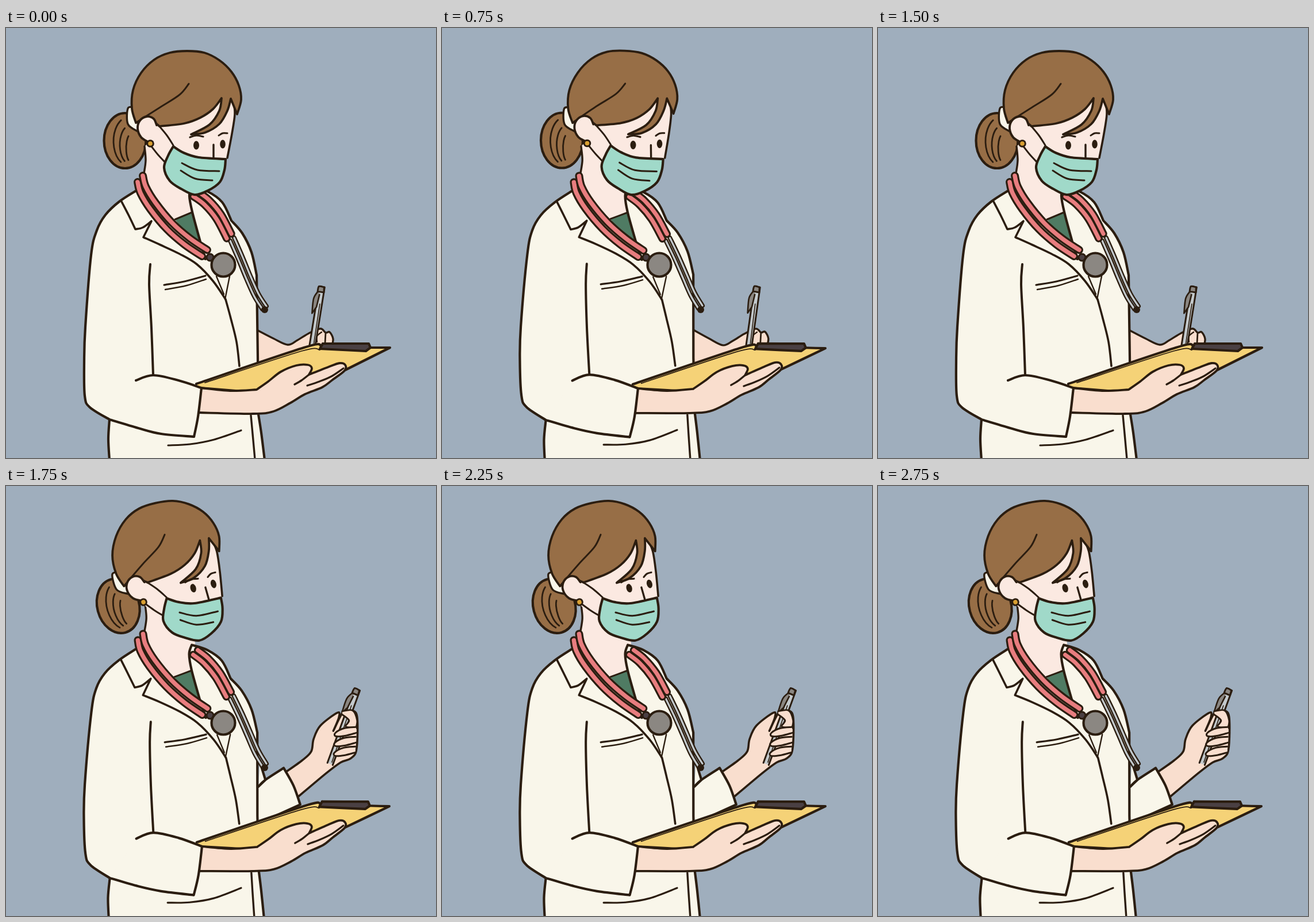
Animation of 748 by 748 pixels, one loop 3000 ms. Source, as an HTML page with a canvas:

```html
<!DOCTYPE html>
<html lang="en">
<head>
<meta charset="utf-8">
<title>Doctor taking notes</title>
<style>
html, body { margin: 0; width: 100%; height: 100%; overflow: hidden; background: #9faebd; }
canvas { display: block; width: 100vw; height: 100vh; }
</style>
</head>
<body>
<canvas id="stage" width="748" height="748"></canvas>
<script>
const ctx = document.getElementById('stage').getContext('2d');
const SKY = '#9faebd', INK = '#2b1d10', COAT = '#f9f6ea', HAIR = '#976e46', FACE = '#fbe9e1',
  SKIN = '#f9dece', MASK = '#a0d9c9', RED = '#e87d7f', GREEN = '#4f7b63', BOARD = '#f5d277',
  STEEL = '#8b8782', DARK = '#4a4043', METAL = '#c3c9cc', GOLD = '#d9a032';

const STEP = 250, STEPS = 12, LIFT = 7;
const EAR = [251, 201], TALK_EAR = [236, 203], TALK_TURN = -Math.PI / 12;
let alt = false;

// Every second drawing is slightly wavy, like redrawn linework.
function warp([x, y]) {
  return alt ? [x + 1.2 * Math.sin(y * 0.03 + 1), y + 1.2 * Math.sin(x * 0.04)] : [x, y];
}

// Smooth curve through "x y" points; "|" marks a corner.
function curve(text) {
  const path = new Path2D();
  let last = null;
  for (const part of text.split('|')) {
    const n = part.trim().split(/\s+/).map(Number);
    const p = last ? [last] : [];
    for (let i = 0; i < n.length; i += 2) p.push(warp([n[i], n[i + 1]]));
    if (!last) path.moveTo(...p[0]);
    for (let i = 0; i < p.length - 1; i++) {
      const a = p[i - 1] || p[i], b = p[i], c = p[i + 1], d = p[i + 2] || c;
      path.bezierCurveTo(b[0] + (c[0] - a[0]) / 6, b[1] + (c[1] - a[1]) / 6,
        c[0] - (d[0] - b[0]) / 6, c[1] - (d[1] - b[1]) / 6, c[0], c[1]);
    }
    last = p[p.length - 1];
  }
  return path;
}

function stroke(path, width, color = INK) {
  ctx.lineWidth = width;
  ctx.strokeStyle = color;
  ctx.stroke(path);
}

function line(text, width = 4, color = INK) {
  stroke(curve(text), width, color);
}

function fill(text, color) {
  ctx.fillStyle = color;
  ctx.fill(curve(text));
}

function shape(text, color, width = 4.2) {
  fill(text, color);
  line(text, width);
}

function oval(x, y, rx, ry, color, width = 0) {
  const path = new Path2D();
  path.ellipse(x, y, rx, ry, 0, 0, Math.PI * 2);
  ctx.fillStyle = color;
  ctx.fill(path);
  if (width) stroke(path, width);
}

function at(x, y, angle, paint) {
  ctx.save();
  ctx.translate(x, y);
  ctx.rotate(angle);
  paint();
  ctx.restore();
}

// The head is one drawing that turns about the earring.
function onHead(talk, paint) {
  const [x, y] = talk ? TALK_EAR : EAR;
  const shift = alt ? (talk ? 3 : 1.5) : 0;
  at(x + shift, y - shift / 3, talk ? TALK_TURN : 0, () => {
    ctx.translate(-EAR[0], -EAR[1]);
    paint();
  });
}

function drawBun() {
  oval(207, 196, 36.5, 48, HAIR, 4.2);
  for (let k = 0; k < 3; k++) {
    const fold = new Path2D();
    fold.ellipse(213 + 2 * k, 197 + 6 * k, 26 - 9 * k, 42 - 9 * k, 0, 2.1, 4.2);
    stroke(fold, 2.8);
  }
  shape('222 138 212 140 212 167 229 180 | 240 160', COAT, 3.4);
}

function drawNeck() {
  fill('241 206 | 243 230 240 253 | 228 282 | 240 300 280 348 347 402 | 338 372 | 325 240 | 270 180', FACE);
  fill('294 333 | 325 320 | 338 374 | 325 374', GREEN);
  line('294 333 | 325 320', 3);
  line('241 206 243 230 240 253', 3.4);
}

function drawHead(talk) {
  fill('240 160 | 300 120 | 395 125 | 398 150 393 185 384 228 | 330 280 | 285 262 | 248 203', FACE);
  line('396 128 398 150 393 184 385 226', 3.6);
  shape('226 165 219 140 221 108 235 78 258 55 285 43 315 40 345 43 371 56 392 76 405 100 409 125 402 150'
    + '| 391 123 | 385 144 371 167 346 182 322 185 | 354 168 371 144 375 122'
    + '| 360 141 338 156 310 166 267 171 | 250 157 | 226 165', HAIR, 3.8);
  line('318 97 302 116 268 138 227 164', 3);
  shape('262 169 257 158 245 154 233 161 229 175 235 190 247 198', FACE, 3.8);
  line('266 170 280 187 291 204', 3);
  line('253 206 264 220 278 235', 3);
  oval(...EAR, 6.8, 6.8, INK);
  oval(...EAR, 3.8, 3.8, GOLD);
  const [x, y] = talk ? [341, 200] : [331, 204];
  oval(x, y, 5, 7.5, INK);
  oval(377, 202, 4.8, 7.5, INK);
  line(`${x - 11} ${y - 14} ${x} ${y - 17} ${x + 12} ${y - 15}`, 3.2);
  line('370 187 377 183 385 183', 3);
  line('361 203 361 226', 3.4);
  shape('291 206 309 217 335 225 382 228 | 380 247 372 268 351 283 328 290 305 280 285 266 275 243 282 222 291 206', MASK);
  line('306 235 333 247 371 249', 3);
  line('304 248 329 262 359 265', 3);
}

function drawPen(x, y, angle, length) {
  at(x, y, angle, () => {
    shape(`-5 0 | -4 ${-length} | 6 ${-length} | 5 0`, METAL, 3);
    line(`2 -4 | 2 ${30 - length}`, 1.6);
    shape(`-4 ${8 - length} | -10 ${22 - length} -9 ${48 - length} | -3 ${36 - length} | -1 ${14 - length}`, STEEL, 2.6);
    shape(`-5 ${9 - length} | -4 ${-length} 5 ${-length} | 6 ${9 - length} | -5 ${9 - length}`, STEEL, 3);
  });
}

function drawWritingHand() {
  shape('436 525 465 540 490 551 507 543 527 531 547 523 556 530 563 529 569 541 566 556 | 436 590', SKIN, 3.4);
  line('541 546 541 536 549 529', 2.4);
  line('556 530 555 548', 2.8);
  drawPen(533, 552, 0.15, 103);
}

function drawRaisedArm() {
  const skin = alt ? SKIN : FACE;
  at(500, alt ? 518 : 510, alt ? 0.1 : 0, () => {
    ctx.translate(-500, -510);
    shape('484 491 510 467 524 450 526 428 536 404 564 380 567 388 559 412'
      + '| 575 376 590 374 599 386 602 440 594 457 577 466 555 486 511 531', skin, 3.6);
    drawPen(559, 469, 0.25, 138);
    shape('572 377 590 374 599 390 598 404 | 580 403 585 392 573 383', skin, 3);
    for (let i = 0; i < 3; i++) {
      at(i, 17 * i, 0, () => shape('598 402 578 406 563 415 564 421 580 419 599 412', skin, 3));
    }
  });
  shape('441 480 452 512 | 440 524 | 452 512 483 490 | 501 520 513 553 | 436 590', COAT);
}

function drawCoat() {
  shape('228 282 197 302 173 325 158 352 148 395 138 520 136 580 137 640 146 660 180 681'
    + '| 178 715 180 752 | 450 752 | 444 704 439 672 | 438 575 | 436 430 | 427 390 411 357 392 335'
    + '| 376 303 350 284 323 276 | 319 292 324 320 338 372 | 347 402 | 280 348 240 300 228 282', COAT);
  line('426 674 429 706 433 750', 3.4);
  line('282 726 320 724 362 716 409 700', 3.2);
  line('200 300 213 325 225 350 | 238 347 253 336 | 239 364 | 268 377 302 393 332 411 360 440 382 472'
    + '| 391 505 401 546 406 588', 3.6);
  line('366 432 379 463', 2.4);
  line('389 432 381 472', 2.4);
  line('347 431 310 441 275 447', 3.2);
  line('348 437 314 448 277 455', 2.4);
  line('251 411 249 446 253 522 256 604');
}

function drawBoard() {
  shape('331 619 | 518 556 548 552 | 634 556 | 668 556 | 590 595 | 436 634 | 338 626', BOARD);
  line('346 617 | 514 562 546 560', 1.8);
  shape('551 549 | 631 549 | 634 556 | 626 562 | 546 558 | 551 549', DARK);
}

function drawFrontArm() {
  shape('338 626 390 631 436 629 | 456 615 478 598 505 587 525 586 532 592 527 603 | 560 590 580 583 590 586'
    + '589 596 568 612 550 625 520 637 495 652 465 667 430 671 336 669'.replace(/^/, ' '), SKIN, 3.8);
  line('527 603 514 613 502 620', 3.4);
  line('587 592 566 606 545 615 524 622', 3.2);
  shape('180 681 230 696 270 706 327 711 | 334 676 340 626 | 300 613 256 604 226 613', COAT);
}

// Two equal tubes side by side.
function twin(text, dx, dy, color, outer, inner) {
  for (let i = 0; i < 2; i++) {
    at(i * dx, i * dy, 0, () => {
      line(text, outer);
      line(text, inner, color);
    });
  }
}

function drawStethoscope() {
  twin('390 370 404 402 418 436 432 467 446 489', 7, -5, METAL, 8, 3.2);
  oval(450, 490, 6, 6, INK);
  twin('326 293 345 307 366 332 384 366', 8, -8, RED, 13.5, 7);
  twin('229 268 234 287 251 315 280 350 311 377 341 397', 9, -11, RED, 14, 7.5);
  oval(355, 399, 6, 6, DARK, 3);
  oval(378, 412, 20.5, 20.5, STEEL, 4.2);
}

function draw(step) {
  const talk = step >= LIFT;
  alt = step % 2 === 1;
  ctx.lineCap = ctx.lineJoin = 'round';
  ctx.fillStyle = SKY;
  ctx.fillRect(0, 0, 748, 748);
  onHead(talk, drawBun);
  drawNeck();
  if (talk) drawRaisedArm(); else drawWritingHand();
  drawCoat();
  drawBoard();
  drawFrontArm();
  drawStethoscope();
  onHead(talk, () => drawHead(talk));
}

const start = performance.now();
let shown = -1;
function tick() {
  const step = Math.floor((performance.now() - start) / STEP) % STEPS;
  if (step !== shown) draw(shown = step);
  requestAnimationFrame(tick);
}
tick();
</script>
</body>
</html>
```
